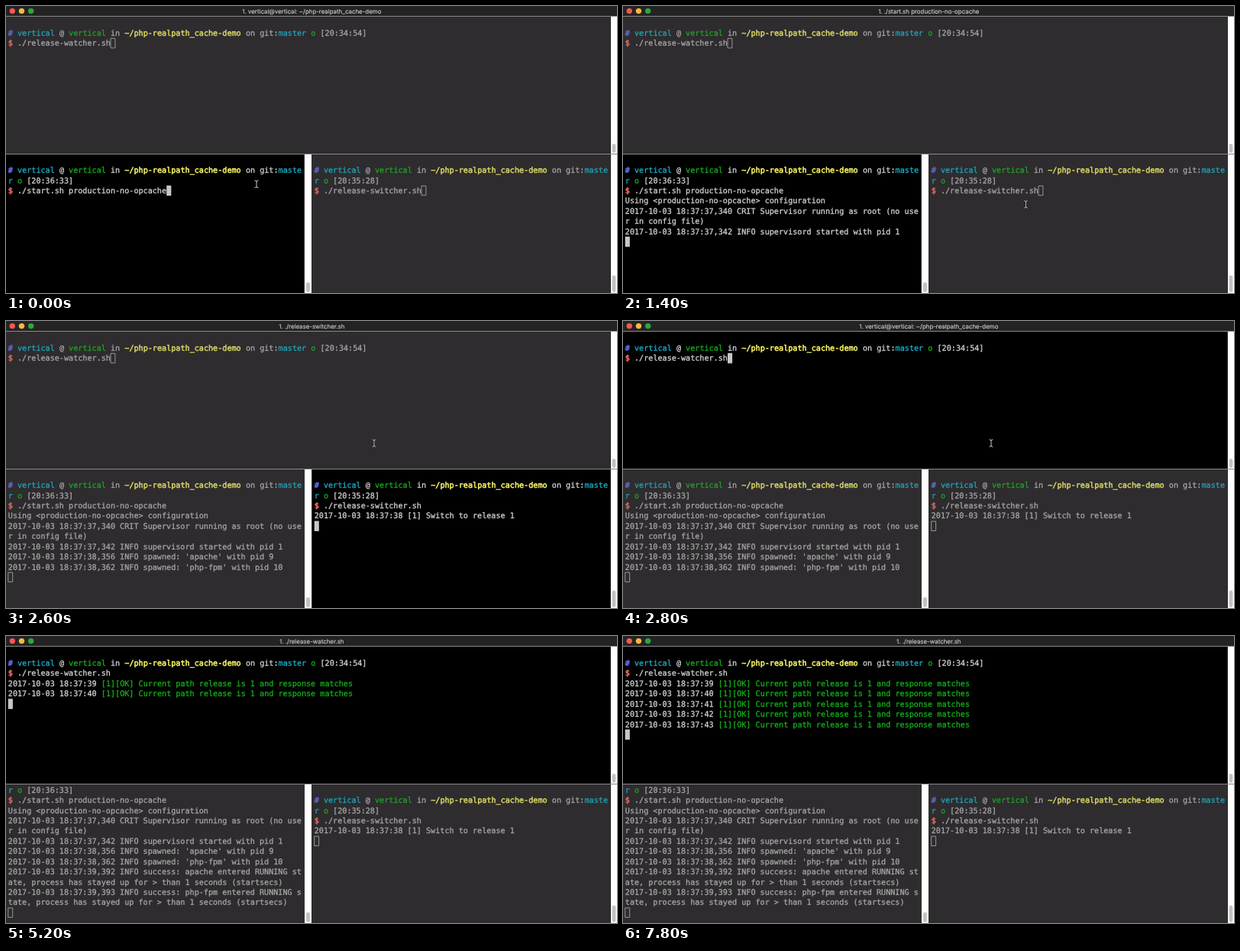
Animation of 800x377 px, one loop 8000 ms. Source, as an HTML page with a canvas:

```html
<!DOCTYPE html>
<html lang="en">
<head>
<meta charset="utf-8">
<title>Terminal</title>
<style>
html, body { margin: 0; width: 100%; height: 100%; overflow: hidden; background: #2e2c2e; }
canvas { display: block; width: 100vw; height: 100vh; }
</style>
</head>
<body>
<canvas id="stage"></canvas>
<script>
const W = 800, H = 377, LOOP = 8000, STEP = 200;
const FONT = 10.14, ADV = 6.1, ROW = 13.43;
const MONO = '"DejaVu Sans Mono", "Liberation Mono", monospace';
const SANS = 'Inter, "Liberation Sans", sans-serif';
const DIM_BG = '#2e2c2e', DIVIDER = '#8a898a';

const canvas = document.getElementById('stage');
const ctx = canvas.getContext('2d');
const dpr = window.devicePixelRatio || 1;
canvas.width = W * dpr;
canvas.height = H * dpr;

// Each style: active colour, dimmed colour, bold
const STYLES = {
  text: ['#d2d2d2', '#a6a5a6'],
  hash: ['#6c76ff', '#626ad0', true],
  cyan: ['#18b0c8', '#22a2b6'],
  green: ['#14b01a', '#22a028'],
  path: ['#fffc67', '#d8d565', true],
  red: ['#ff6e67', '#dc6963', true]
};

const USER = 'vertical';
const DIR = '~/php-realpath_cache-demo';
const SHELL = `${USER}@${USER}: ${DIR}`;

const plain = s => [['text', s]];

const prompt = (time, command) => [
  [],
  [['hash', '#'], ['cyan', ` ${USER}`], ['text', ' @ '], ['green', USER], ['text', ' in '],
   ['path', DIR], ['text', ' on git:'], ['cyan', 'master'], ['green', ' o'], ['text', ` [${time}]`]],
  [['red', '$'], ['text', ` ${command}`]]
];

const log = (at, time, message) => ({ at, line: plain(`2017-10-03 18:37:${time} ${message}`) });
const success = (time, name) =>
  log(3200, time, `INFO success: ${name} entered RUNNING state, process has stayed up for > than 1 seconds (startsecs)`);

const checks = Array.from({ length: 5 }, (_, i) => ({
  at: 3400 + i * 1000,
  line: [['text', `2017-10-03 18:37:${39 + i} `],
         ['green', '[1][OK] Current path release is 1 and response matches']]
}));

const panes = [
  { x: 0, y: 14, w: 792, h: 180, bar: 8, textX: 2.8, textY: 15.3, cols: 128, rows: 13, thumb: [181, 12],
    time: '20:34:54', command: './release-watcher.sh', enter: 3200, output: checks },
  { x: 0, y: 195, w: 391, h: 182, bar: 9, textX: 2.8, textY: 195.5, cols: 63, rows: 13, thumb: [363, 13],
    time: '20:36:33', command: './start.sh production-no-opcache', enter: 200,
    output: [
      { at: 400, line: plain('Using <production-no-opcache> configuration') },
      log(1000, '37,340', 'CRIT Supervisor running as root (no user in config file)'),
      log(1000, '37,342', 'INFO supervisord started with pid 1'),
      log(2200, '38,356', "INFO spawned: 'apache' with pid 9"),
      log(2200, '38,362', "INFO spawned: 'php-fpm' with pid 10"),
      success('39,392', 'apache'),
      success('39,393', 'php-fpm')
    ] },
  { x: 400, y: 195, w: 392, h: 182, bar: 8, textX: 403.7, textY: 195.5, cols: 63, rows: 13, thumb: [354, 22],
    time: '20:35:28', command: './release-switcher.sh', enter: 2000,
    output: [log(2200, '38', '[1] Switch to release 1')] }
];

const activePane = t => t < 1600 ? panes[1] : t < 2800 ? panes[2] : panes[0];

// Splits styled lines into glyph runs on the character grid
function layout(lines, cols) {
  const runs = [];
  let row = 0, col = 0;
  lines.forEach((line, i) => {
    if (i) { row++; col = 0; }
    for (const [style, text] of line) {
      let rest = text;
      while (rest) {
        if (col === cols) { row++; col = 0; }
        const part = rest.slice(0, cols - col);
        runs.push({ style, text: part, row, col });
        col += part.length;
        rest = rest.slice(part.length);
      }
    }
  });
  return { runs, row, col };
}

function fill(color, x, y, w, h) {
  ctx.fillStyle = color;
  ctx.fillRect(x, y, w, h);
}

function disc(color, x, y, r) {
  ctx.fillStyle = color;
  ctx.beginPath();
  ctx.arc(x, y, r, 0, Math.PI * 2);
  ctx.fill();
}

// A thin outline gives the heavier look of smoothed terminal text
function drawText(text, x, y, color, weight) {
  ctx.fillStyle = ctx.strokeStyle = color;
  ctx.lineWidth = weight;
  ctx.fillText(text, x, y);
  ctx.strokeText(text, x, y);
}

function drawScrollbar(p) {
  const x = p.x + p.w, [y, h] = p.thumb;
  fill('#fdfdfd', x, p.y, p.bar, p.h);
  ctx.fillStyle = '#c1c1c1';
  ctx.beginPath();
  ctx.roundRect(x + p.bar / 2 - 2.4, y, 4.8, h, 2.4);
  ctx.fill();
}

function drawPane(p, t) {
  const active = p === activePane(t);
  fill(DIM_BG, p.x, p.y, p.w, p.h);
  if (active) fill('#000', p.x && p.x + 1, p.y, p.w - (p.x ? 2 : 1), p.h);

  const lines = prompt(p.time, p.command);
  if (t >= p.enter) {
    lines.push(...p.output.filter(o => t >= o.at).map(o => o.line), []);
  }
  const { runs, row, col } = layout(lines, p.cols);
  const scroll = Math.max(0, row - p.rows + 1);
  const top = r => p.textY + (r - scroll) * ROW;

  ctx.font = `${FONT}px ${MONO}`;
  ctx.textAlign = 'left';
  ctx.textBaseline = 'alphabetic';
  ctx.lineJoin = 'round';
  for (const r of runs) {
    if (r.row < scroll) continue;
    const [bright, dim, bold] = STYLES[r.style];
    drawText(r.text, p.textX + r.col * ADV, top(r.row) + 10.2, active ? bright : dim, bold ? 0.5 : 0.3);
  }

  const cx = p.textX + col * ADV, cy = top(row);
  if (active) {
    fill('#c7c7c7', cx, cy, ADV, ROW);
  } else {
    ctx.strokeStyle = '#a3a2a3';
    ctx.lineWidth = 0.9;
    ctx.strokeRect(cx + 0.4, cy + 0.5, ADV - 0.6, ROW - 1);
  }
  drawScrollbar(p);
}

function drawTitle(t) {
  fill('#242324', 0, 0, W, 13);
  fill(DIVIDER, 0, 13, W, 1);
  ['#f6574f', '#f8b93c', '#2aa742'].forEach((color, i) => disc(color, 8.3 + i * 12.2, 6.6, 3.7));
  const p = activePane(t);
  ctx.font = `7.9px ${SANS}`;
  ctx.textAlign = 'center';
  ctx.textBaseline = 'alphabetic';
  drawText(`1. ${t >= p.enter ? p.command : SHELL}`, 400.3, 9.6, '#cbcacb', 0.15);
}

const ease = k => k * k * (3 - 2 * k);

function glide(t, start, end, from, to) {
  const k = ease(Math.min(1, Math.max(0, (t - start) / (end - start))));
  return from.map((v, i) => v + (to[i] - v) * k);
}

// The pointer hides while keys are pressed
function pointer(t) {
  const a = [328, 234], b = [527.5, 260.5], c = [482, 160.5];
  if (t < 200) return a;
  if (t >= 800 && t < 2000) return glide(t, 800, 1400, a, b);
  if (t >= 2200 && t < 3200) return glide(t, 2000, 2600, b, c);
  return null;
}

function drawPointer(t) {
  const pos = pointer(t);
  if (!pos) return;
  const [x, y] = pos;
  ctx.lineCap = 'round';
  for (const [color, width] of [['#111', 1.8], ['#d0d0d0', 0.9]]) {
    ctx.strokeStyle = color;
    ctx.lineWidth = width;
    ctx.beginPath();
    ctx.moveTo(x, y - 4);
    ctx.lineTo(x, y + 4);
    for (const s of [-1, 1]) {
      ctx.moveTo(x - 2, y + s * 4.7);
      ctx.quadraticCurveTo(x, y + s * 4.5, x, y + s * 3.3);
      ctx.quadraticCurveTo(x, y + s * 4.5, x + 2, y + s * 4.7);
    }
    ctx.stroke();
  }
}

function draw(t) {
  ctx.setTransform(dpr, 0, 0, dpr, 0, 0);
  ctx.textRendering = 'geometricPrecision';
  panes.forEach(p => drawPane(p, t));
  fill(DIVIDER, 0, 194, W, 1);
  drawTitle(t);
  drawPointer(t);
}

const start = performance.now();
function tick() {
  const t = (performance.now() - start) % LOOP;
  draw(Math.floor(t / STEP) * STEP);
  requestAnimationFrame(tick);
}
tick();
</script>
</body>
</html>
```
